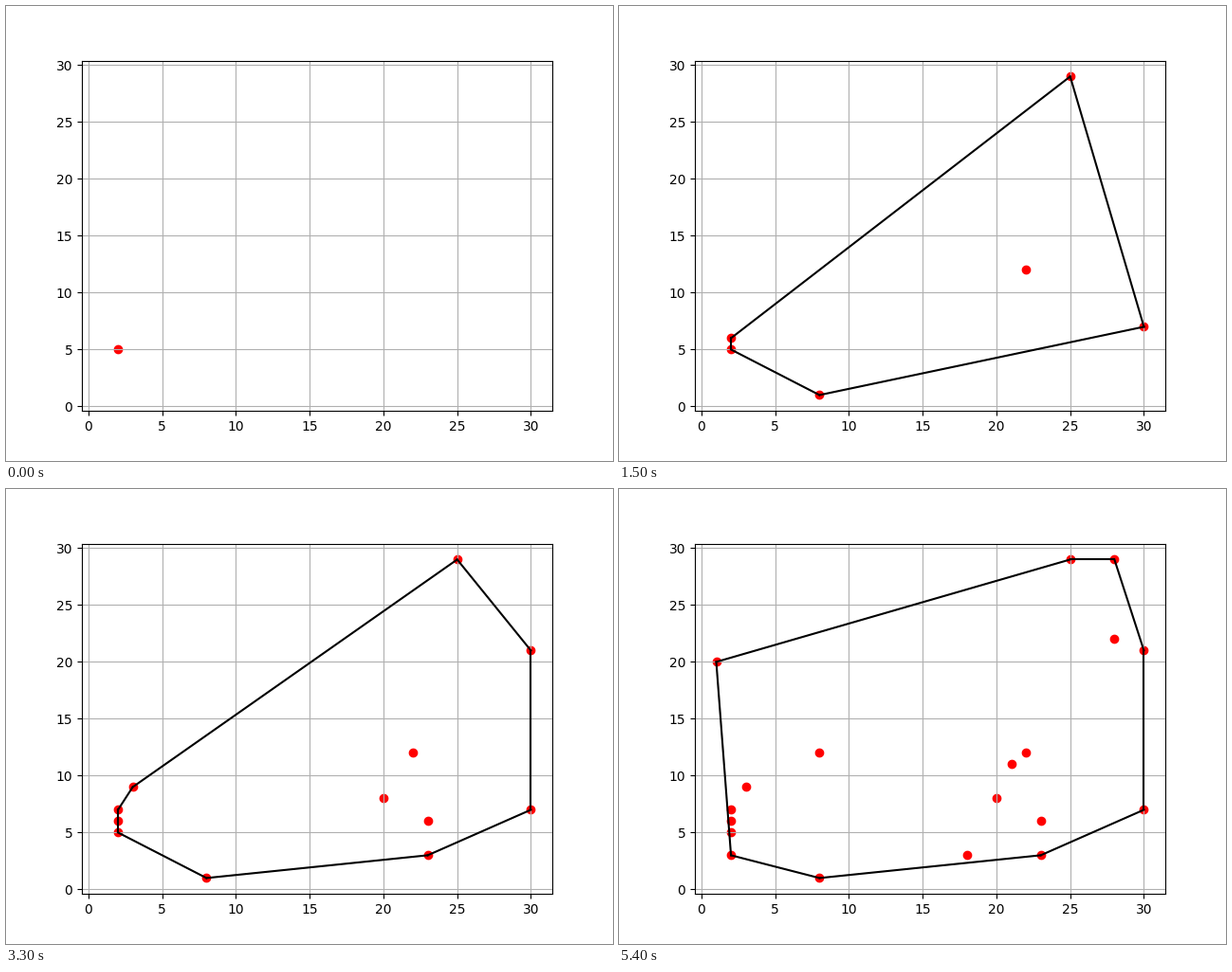
Recreate the animation shown at these times as a matplotlib script. Size 640 by 480 pixels, loop 5700 ms.

```python
from itertools import zip_longest

import matplotlib.pyplot as plt
from matplotlib.animation import FuncAnimation

STEP_MS = 300

# Points in order of appearance; outline and axis limits follow from them.
POINTS = [
    (2, 5), (2, 6), (22, 12), (25, 29), (30, 7), (8, 1), (3, 9),
    (30, 21), (23, 3), (23, 6), (20, 8), (2, 7), (21, 11), (28, 22),
    (1, 20), (2, 3), (8, 12), (28, 29), (18, 3),
]


def cross(o, a, b):
    return (a[0] - o[0]) * (b[1] - o[1]) - (a[1] - o[1]) * (b[0] - o[0])


def half_hull(points):
    chain = []
    for p in points:
        while len(chain) > 1 and cross(chain[-2], chain[-1], p) <= 0:
            chain.pop()
        chain.append(p)
    return chain


def hull_edges(points):
    """Sides of the convex hull as pairs of corner points."""
    order = sorted(points)
    edges = []
    for chain in (half_hull(order), half_hull(order[::-1])):
        edges += zip(chain, chain[1:])
    return edges


fig, ax = plt.subplots(figsize=(6.4, 4.8), dpi=100)
dots = ax.scatter(*zip(*POINTS), color="red")
ax.autoscale_view()
ax.autoscale(False)
ax.grid(True)

# One line per side, so that upright and level sides stay crisp.
sides = [ax.plot([], [], color="black")[0] for _ in POINTS]


def draw(i):
    shown = POINTS[:i + 1]
    dots.set_offsets(shown)
    for side, edge in zip_longest(sides, hull_edges(shown)):
        side.set_data(*(zip(*edge) if edge else ([], [])))
    return [dots, *sides]


anim = FuncAnimation(fig, draw, frames=len(POINTS), interval=STEP_MS,
                     repeat=True, repeat_delay=0)
plt.show()
```
